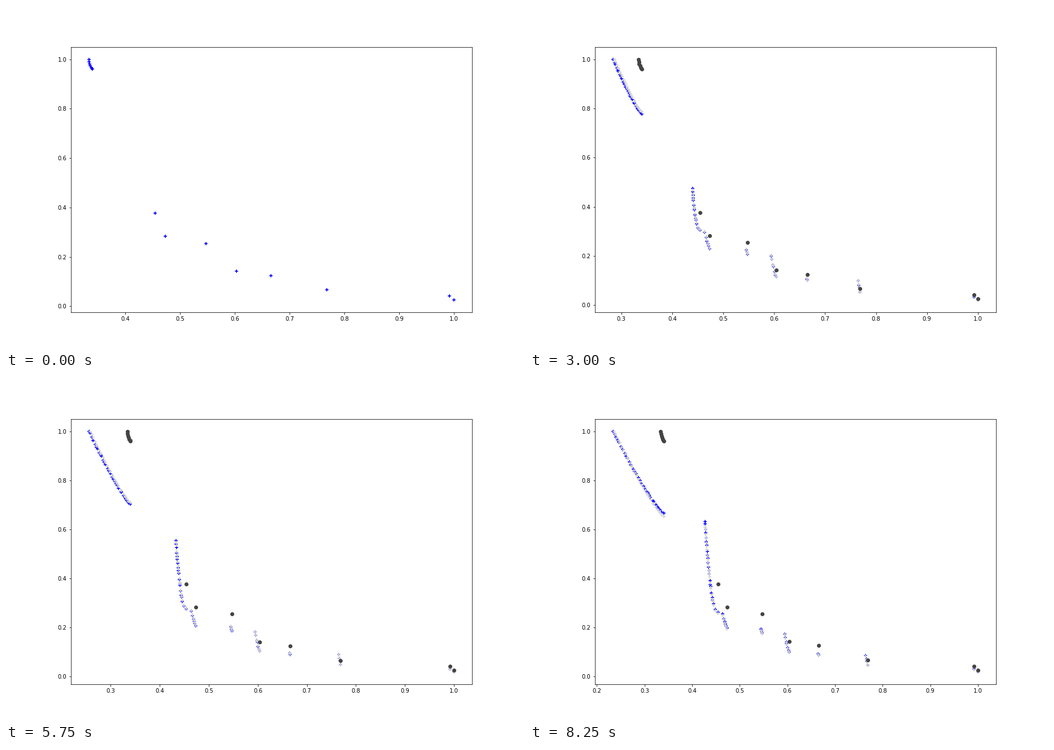
Animation of 917x611 px, one loop 8.5 s. Source, as a matplotlib script:

```python
import matplotlib.pyplot as plt
import numpy as np
from matplotlib.animation import FuncAnimation

W, H, DPI = 917, 611, 72
FRAMES, INTERVAL = 34, 250

# Lower points: x, y, then the width, height and size of the branch each grows
BRANCHES = [
    (.4733, .283, .0095, .083, 6),
    (.5475, .255, .0025, .023, 3),
    (.6036, .142, .0095, .106, 7),
    (.6655, .125, .001, .007, 2),
    (.7685, .066, .004, .056, 4),
    (.992, .0415, 0, 0, 1),
    (1, .025, 0, 0, 1)]
BEND = (.4542, .377)     # foot of the steep middle front
CORNER = (.34, .96)      # lower end of the left front

# Each generation is divided by its own largest y: (generation, factor)
SCALE = [(0, 1), (6, .859), (12, .81), (17, .75), (18, .765),
         (23, .732), (30, .677), (32, .68), (33, .693)]


def spread(n, seed):
    """n slightly uneven positions from 0 to 1, both ends included."""
    u = np.linspace(0, 1, n)
    if n > 2:
        rng = np.random.default_rng(seed)
        u[1:-1] += rng.uniform(-.4, .4, n - 2) / (n - 1)
    return u


def first_population():
    u = 1 - (1 - np.linspace(0, 1, 7)) ** 1.5
    left = np.column_stack([.334 + .006 * u ** 2, 1 - .04 * u])
    return np.vstack([left, BEND, [b[:2] for b in BRANCHES]])


START = first_population()


def left_front(gen, grow, scale):
    reach = .006 + .0093 * gen ** .68
    u = spread(int(7 + (15 + .35 * gen) * grow), 7)
    x, y = CORNER
    return x - reach * u, y + (1 / scale - y) * u ** 1.2


def middle_front(gen, grow):
    rise = (.023 + .0155 * gen) * spread(int(1 + (8 + .45 * gen) * grow), 11)
    x, y = BEND
    return x - (.026 + .0003 * gen) * rise ** .45, y + rise


def population(gen):
    if gen == 0:
        return START
    grow = min(1, gen / 5)
    scale = np.interp(gen, *zip(*SCALE))
    parts = [left_front(gen, grow, scale), middle_front(gen, grow)]
    for i, (x, y, dx, dy, n) in enumerate(BRANCHES):
        u = spread(max(1, round(n * grow)), i) * grow
        parts.append((x - dx * u, y + dy * u ** 1.2))
    return np.hstack(parts).T * (1, scale)


fig, ax = plt.subplots(figsize=(W / DPI, H / DPI), dpi=DPI)


def draw(gen):
    ax.clear()
    ax.scatter(*population(gen).T, marker='+', color='blue')
    if gen:
        ax.scatter(*population(gen - 1).T, marker='+', color='lightgray')
        ax.scatter(*START.T, marker='o', color='#444444')


anim = FuncAnimation(fig, draw, frames=FRAMES, interval=INTERVAL,
                     repeat=True, repeat_delay=0)
plt.show()
```
